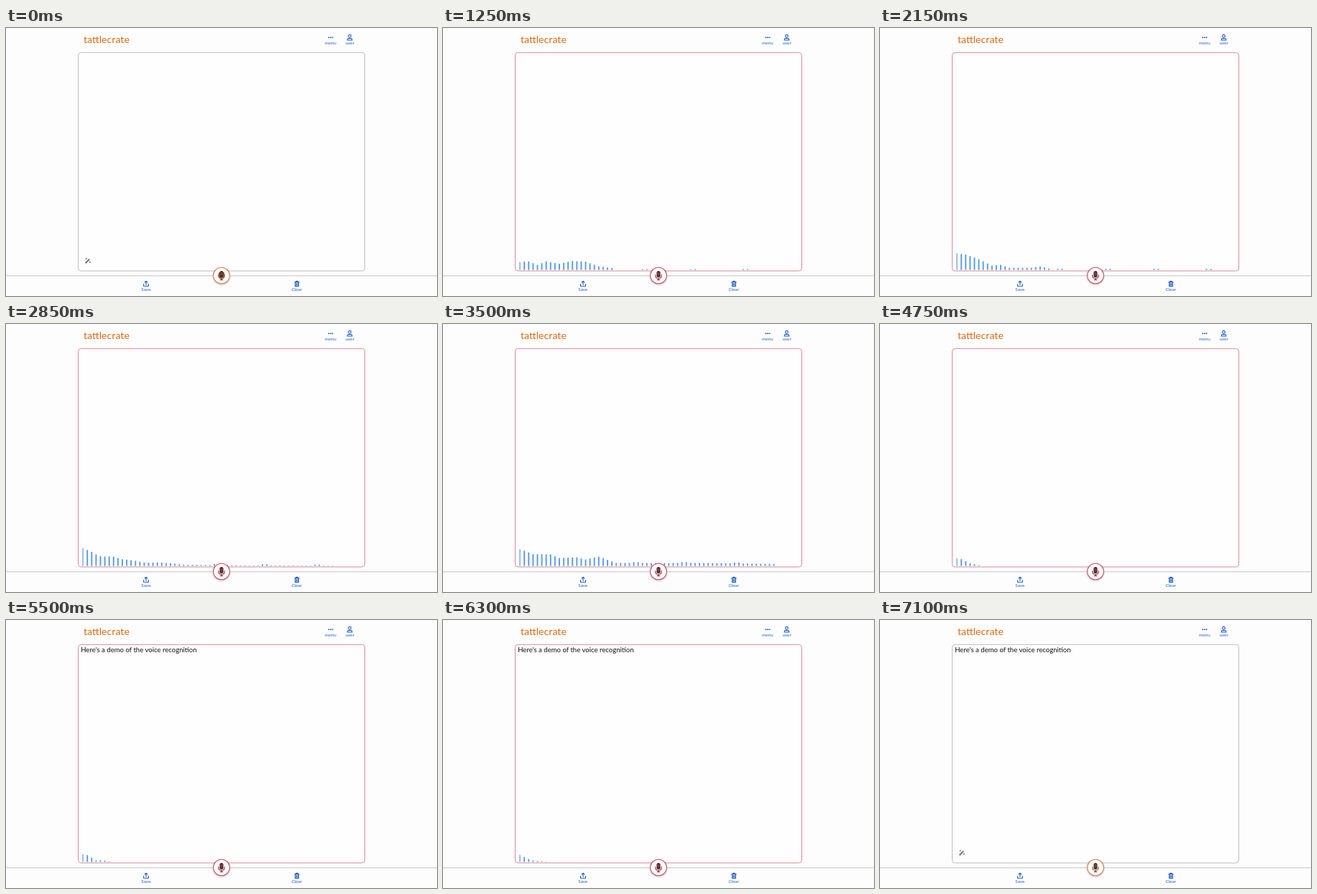
Animation, 600 px wide and 374 px high, one loop 7.45 s. Source, as an HTML page:

```html
<!DOCTYPE html>
<html lang="en">
<head>
<meta charset="utf-8">
<title>Voice notes</title>
<style>
  html, body { margin: 0; width: 100%; height: 100%; overflow: hidden; background: #fefdfe; }
  svg { display: block; width: 100%; height: 100%; font-family: Lato, "Noto Sans", sans-serif; }
  .label { font-size: 6.4px; fill: #2262cb; text-anchor: middle; }
  .icon { fill: none; stroke: #2262cb; stroke-width: 1.15; stroke-linecap: round; stroke-linejoin: round; }
</style>
</head>
<body>
<svg viewBox="0 0 600 374">
  <defs>
    <filter id="soft" x="-30%" y="-30%" width="160%" height="160%">
      <feGaussianBlur stdDeviation="1.1"/>
    </filter>
  </defs>
  <rect width="600" height="374" fill="#fefdfe"/>

  <text x="108" y="21.4" font-size="14.2" fill="#d96b14">tattlecrate</text>
  <path d="M449.4 13.2h0M452 13.2h0M454.6 13.2h0" stroke="#2262cb" stroke-width="2" stroke-linecap="round"/>
  <text class="label" x="452" y="22.8">menu</text>
  <g class="icon">
    <circle cx="478.5" cy="11.2" r="1.9"/>
    <path d="M475.2 17v-.7q0-1.7 1.8-1.7h3q1.8 0 1.8 1.7v.7z"/>
  </g>
  <text class="label" x="478.7" y="22.8">user</text>

  <rect id="box" x="100.5" y="34.3" width="399" height="304.7" rx="4" fill="#fffeff"/>
  <text id="speech" x="104.2" y="45" font-size="9.58" fill="#111">Here's a demo of the voice recognition</text>
  <g id="bars" fill="#5f9fe0"></g>

  <g id="wand" stroke="#777" fill="none">
    <path d="M110.6 328.2L116.2 322.6" stroke-width="2.1"/>
    <path d="M111.8 320.6v2.6M110.5 321.9h2.6M116.8 325.3v2.6M115.5 326.6h2.6" stroke-width=".8"/>
  </g>

  <path d="M0 345.8H600" stroke="#c6c4c6"/>
  <circle cx="300" cy="346.4" r="12" fill="#777" opacity=".4" filter="url(#soft)"/>
  <circle id="ring" cx="300" cy="345.5" r="11.3" fill="#fffefe" stroke-width="1.1"/>
  <ellipse id="glow" cx="300" cy="345" rx="4.7" ry="5.4" fill="#9c5a38"/>
  <g fill="none" stroke-linecap="round">
    <path id="cradle" d="M295.8 344.6v1.2q0 3.7 4.2 3.7t4.2-3.7v-1.2" stroke-width="1.2"/>
    <path d="M300 349.5v2M298.2 351.5h3.6" stroke="#4b3538" stroke-width="1.1"/>
    <rect id="mic" x="297.4" y="339.1" width="5.2" height="9" rx="2.6"/>
    <path d="M298.5 342h3M298.5 344h3" stroke="#9a8a8c" stroke-width=".5"/>
  </g>

  <g class="icon">
    <path d="M195 358.2v-4.8M193 355.2l2-2 2 2M191.6 357.6v2.6h6.8v-2.6"/>
    <path d="M401.8 354.6h6.4M403.7 354.4v-1.1h2.6v1.1M402.6 354.8v5.6h4.8v-5.6M404.2 356.4v2.4M405.8 356.4v2.4"/>
  </g>
  <text class="label" x="194.8" y="366.7">Save</text>
  <text class="label" x="404.8" y="366.7">Clear</text>
</svg>
<script>
const LOOP = 7450, STEP = 50, START = 100, STOP = 6450, HEARD = 5400;
const COUNT = 59, PITCH = 6.095, BASE = 337.6;
const el = id => document.getElementById(id);
const clamp = v => Math.max(0, Math.min(1, v));
const mix = (a, b, k) => a + (b - a) * k;

// Spectrum shapes: height of a bar from its index.
const decay = (level, reach) => i => level * Math.exp(-i / reach);
const curve = (...knots) => i => {
  let n = 0;
  while (n + 4 < knots.length && knots[n + 2] < i) n += 2;
  const [x0, y0, x1, y1] = knots.slice(n, n + 4);
  return mix(y0, y1, clamp((i - x0) / (x1 - x0)));
};

const poses = [
  [START, decay(2, 1)],
  [850, decay(13, 4)],
  [1250, curve(0, 11, 2, 12, 4, 7, 6, 12, 9, 8.5, 12, 12.5, 15, 11.5, 18, 5, 21, 2.5, 22, 0)],
  [1700, decay(23, 6)],
  [2150, curve(0, 23, 2, 21.5, 5, 15, 8, 6, 10, 7, 12, 3, 17, 3, 19, 5, 22, .4)],
  [2700, decay(26, 8)],
  [3500, curve(0, 23.5, 3, 16.5, 7, 16, 9, 11, 13, 12, 15, 9, 18, 13, 22, 4, 43, 4, 58, 2.7)],
  [4050, decay(24, 7)],
  [4750, curve(0, 10.5, 1, 9.5, 3, 3.5, 6, 0)],
  [5500, curve(0, 10.5, 1, 9.5, 3, 2.2, 5, 2, 7, 0)],
  [STOP, decay(9, 2)]
];

const bars = Array.from({ length: COUNT }, (_, i) => {
  const bar = document.createElementNS("http://www.w3.org/2000/svg", "rect");
  bar.setAttribute("x", 106.1 + i * PITCH);
  bar.setAttribute("width", 2);
  if (!i) bar.setAttribute("opacity", .65);
  el("bars").append(bar);
  return bar;
});

const blend = (a, b, k) => `rgb(${a.map((v, i) => Math.round(mix(v, b[i], k)))})`;
const show = (id, on) => el(id).setAttribute("visibility", on ? "visible" : "hidden");

function drawBars(t) {
  const next = Math.max(1, poses.findIndex(([time]) => time >= t));
  const [t0, from] = poses[next - 1], [t1, to] = poses[next];
  const k = clamp((t - t0) / (t1 - t0));
  const ripple = Math.sin(Math.PI * k);
  bars.forEach((bar, i) => {
    const wobble = Math.sin(t / 83 + i * .55) * .18 + Math.sin(t / 47 - i * 1.3) * .1;
    const blip = i > 22 && t < 4600 && Math.sin(i * .55 - 20.4 + (t - 1250) / 300) > .85 ? 1.2 : 0;
    const h = Math.min(27, mix(from(i), to(i), k) * (1 + ripple * wobble) + blip);
    bar.setAttribute("y", BASE - h);
    bar.setAttribute("height", h < .5 ? 0 : h);
  });
}

function render(time) {
  const t = Math.floor(time % LOOP / STEP) * STEP;
  const live = t >= START && t < STOP;
  const fade = since => clamp((t - since + STEP) / 200);
  const red = t < START ? 0 : live ? fade(START) : 1 - fade(STOP);
  el("box").setAttribute("stroke", blend([190, 188, 190], [219, 137, 150], red));
  el("ring").setAttribute("stroke", blend([211, 126, 78], [207, 78, 96], red));
  el("cradle").setAttribute("stroke", blend([181, 101, 58], [176, 52, 72], red));
  el("mic").setAttribute("fill", blend([75, 48, 42], [87, 37, 47], red));
  show("glow", t < START);
  show("wand", !live);
  show("bars", live);
  show("speech", t >= HEARD);
  if (live) drawBars(t);
}

const origin = performance.now();
function tick() {
  render(performance.now() - origin);
  requestAnimationFrame(tick);
}
tick();
</script>
</body>
</html>
```
